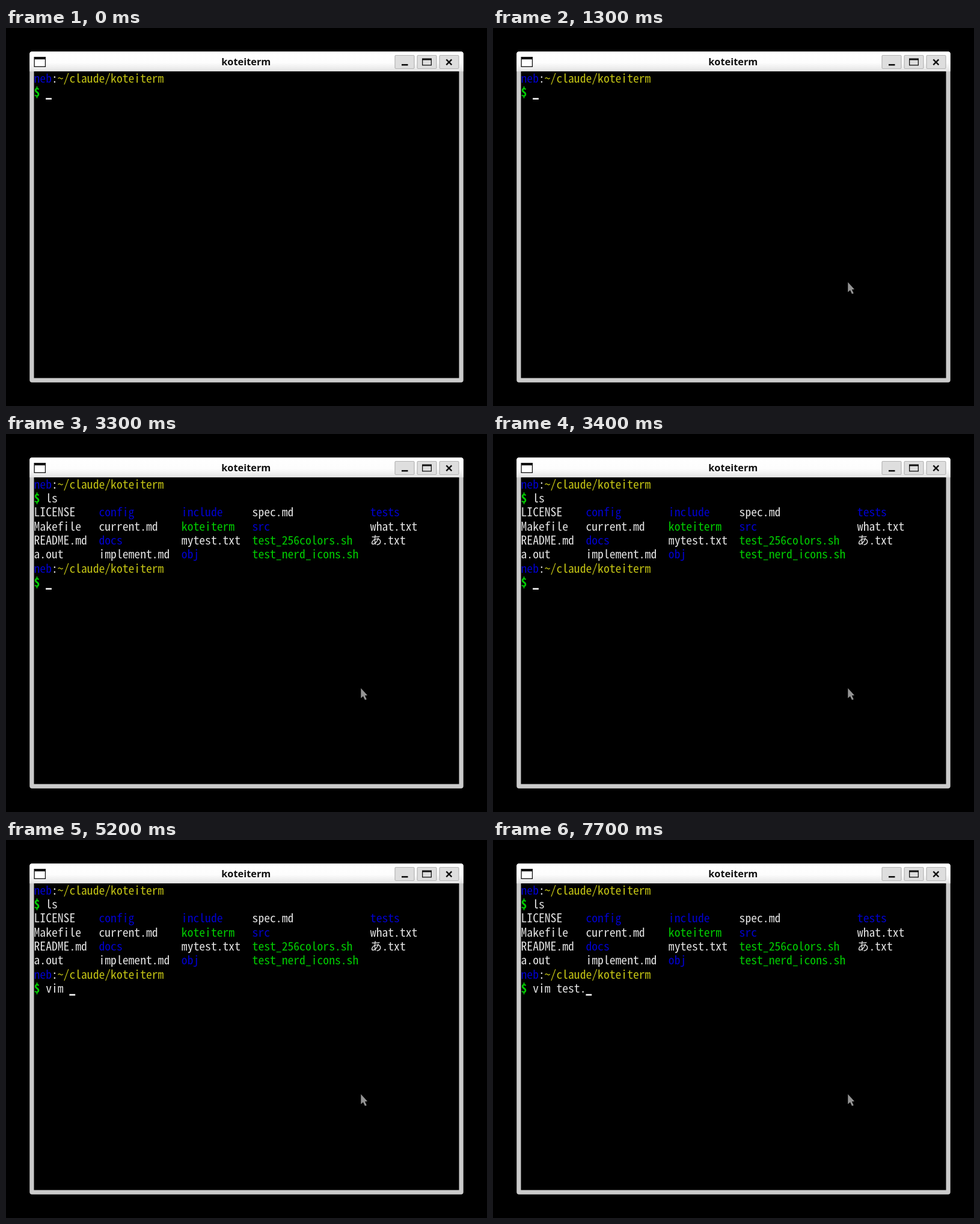
An HTML page with a canvas for the animation above (8000 ms loop, 800 px wide and 629 px high).

```html
<!DOCTYPE html>
<html lang="en">
<head>
<meta charset="utf-8">
<title>koteiterm</title>
<style>
html, body { margin: 0; width: 100%; height: 100%; overflow: hidden; background: #000; }
canvas { display: block; }
</style>
</head>
<body>
<canvas id="stage" width="800" height="629"></canvas>
<script>
const ctx = document.getElementById('stage').getContext('2d');
const LOOP = 8000;
const CELL = { x: 46.5, y: 72.4, w: 9.813, h: 23.31, baseline: 18.4 };
const FONT = `${CELL.w * 2}px "Noto Sans Mono CJK JP", "Noto Sans Mono", monospace`;
const COLORS = { text: '#e2e2e2', dir: '#0000cd', exe: '#00cd00', path: '#c3c314', cursor: '#fff' };
const POINTER_AT = 100;
const LIST_AT = 3100;

// [time, command line content]
const listTyping = [[0, ''], [2700, 'l'], [2900, 'ls']];
const editTyping = [
  [0, ''], [4500, 'v'], [4600, 'vi'], [4800, 'vim'], [5200, 'vim '],
  [6700, 'vim t'], [6800, 'vim te'], [6900, 'vim test'],
  [7100, 'vim test.'], [7200, 'vim test.t'], [7700, 'vim test.']
];

// Each column: start cell, then names; "/" marks a directory, "*" an executable.
const listing = [
  [0, 'LICENSE', 'Makefile', 'README.md', 'a.out'],
  [11, 'config/', 'current.md', 'docs/', 'implement.md'],
  [25, 'include/', 'koteiterm*', 'mytest.txt', 'obj/'],
  [37, 'spec.md', 'src/', 'test_256colors.sh*', 'test_nerd_icons.sh*'],
  [57, 'tests/', 'what.txt', 'あ.txt']
];

function rect(x, y, w, h, color) {
  ctx.fillStyle = color;
  ctx.fillRect(x, y, w, h);
}

function roundRect(x, y, w, h, r, fill, stroke) {
  ctx.beginPath();
  ctx.roundRect(x, y, w, h, r);
  ctx.fillStyle = fill;
  ctx.fill();
  if (stroke) {
    ctx.strokeStyle = stroke;
    ctx.lineWidth = 1.2;
    ctx.stroke();
  }
}

function windowGlyph(x, y, w, h, bar, fill) {
  rect(x, y, w, h, '#111');
  rect(x + 1.3, y + bar, w - 2.6, h - bar - 1.3, fill);
}

function drawWindow() {
  rect(0, 0, 800, 629, '#000');
  roundRect(39.3, 39.3, 721.4, 550.5, 4, '#cbcbcb');

  const bar = ctx.createLinearGradient(0, 40, 0, 72);
  bar.addColorStop(0, '#fff');
  bar.addColorStop(0.55, '#fdfdfd');
  bar.addColorStop(1, '#e4e4e4');
  roundRect(39.3, 39.3, 721.4, 33, [4, 4, 0, 0], bar);
  rect(46.5, 72.2, 707, 510.3, '#000');

  ctx.font = 'bold 16.35px "Noto Sans", sans-serif';
  ctx.textAlign = 'center';
  ctx.fillStyle = '#111';
  ctx.fillText('koteiterm', 399.3, 62);
  ctx.textAlign = 'left';

  windowGlyph(46.5, 48, 19.6, 17, 4.2, '#fff');
  for (const x of [647, 684, 721]) roundRect(x, 45.5, 32, 22, 1.5, '#dedede', '#b4b4b4');
  rect(658, 60, 10.5, 2.6, '#111');
  windowGlyph(692, 50.5, 16, 12, 3, '#dedede');
  ctx.beginPath();
  ctx.moveTo(732.3, 52.3);
  ctx.lineTo(741.3, 61.3);
  ctx.moveTo(741.3, 52.3);
  ctx.lineTo(732.3, 61.3);
  ctx.strokeStyle = '#111';
  ctx.lineWidth = 2.4;
  ctx.stroke();
}

function print(text, col, row, color, weight = 'normal') {
  ctx.font = `${weight} ${FONT}`;
  ctx.fillStyle = color;
  const y = CELL.y + row * CELL.h + CELL.baseline;
  for (const char of text) {
    ctx.fillText(char, CELL.x + col * CELL.w, y);
    col += char > '\u2fff' ? 2 : 1;
  }
}

function drawPrompt(row, command) {
  print('neb', 0, row, COLORS.dir);
  print(':', 3, row, COLORS.text);
  print('~/claude/koteiterm', 4, row, COLORS.path);
  print('$', 0, row + 1, COLORS.exe, 'bold');
  print(command, 2, row + 1, COLORS.text);
}

function drawCursor(col, row) {
  rect(CELL.x + col * CELL.w, CELL.y + (row + 1) * CELL.h - 2.5, CELL.w, 2.5, COLORS.cursor);
}

function drawListing() {
  for (const [col, ...names] of listing) {
    names.forEach((name, i) => {
      const kind = name.endsWith('/') ? 'dir' : name.endsWith('*') ? 'exe' : 'text';
      print(name.replace(/[/*]$/, ''), col, i + 2, COLORS[kind]);
    });
  }
}

function drawPointer() {
  const points = [[590.3, 423], [590.3, 439.5], [594, 436.2], [597, 442.6],
    [599.8, 441.4], [596.9, 435.2], [601, 434.8]];
  ctx.beginPath();
  points.forEach(([x, y]) => ctx.lineTo(x, y));
  ctx.closePath();
  ctx.fillStyle = '#949494';
  ctx.fill();
}

function typedAt(steps, time) {
  return steps.filter(([start]) => start <= time).pop()[1];
}

function draw(time) {
  drawWindow();
  const command = typedAt(listTyping, time);
  drawPrompt(0, command);
  if (time < LIST_AT) {
    drawCursor(2 + command.length, 1);
  } else {
    const edit = typedAt(editTyping, time);
    drawListing();
    drawPrompt(6, edit);
    drawCursor(2 + edit.length, 7);
  }
  if (time >= POINTER_AT) drawPointer();
}

const origin = performance.now();
function tick() {
  draw((performance.now() - origin) % LOOP);
  requestAnimationFrame(tick);
}
tick();
</script>
</body>
</html>
```
